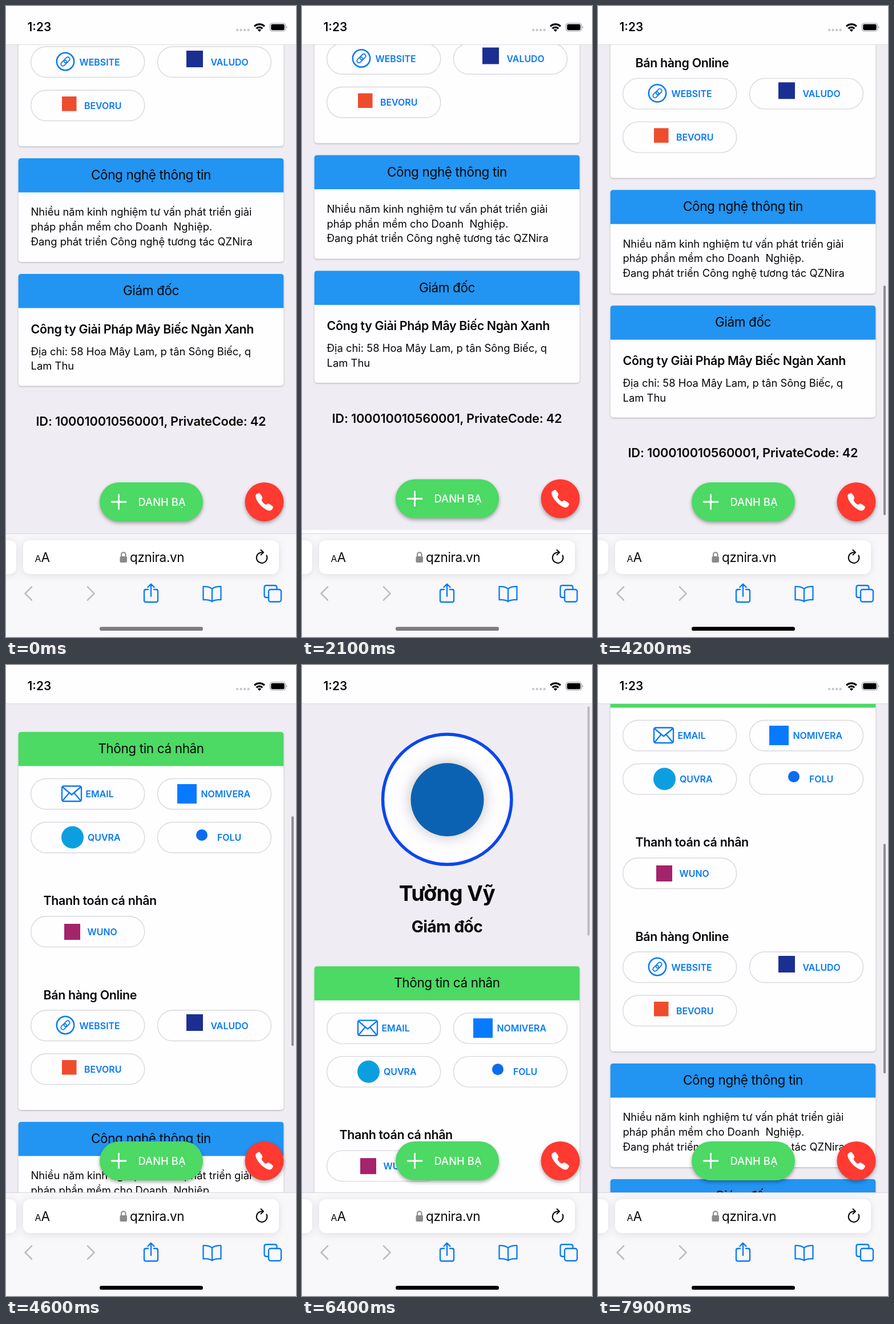
Animation, 508 px wide and 1102 px high, one loop 8 s. Source, as an HTML page:

```html
<!DOCTYPE html>
<html lang="vi">
<head>
<meta charset="utf-8">
<title>Danh thiếp</title>
<style>
  html, body { margin: 0; width: 100%; height: 100%; overflow: hidden; background: #fefdff; }
  svg { display: block; width: 508px; height: 1102px; }
  text { font-family: Inter, Roboto, sans-serif; fill: #080808; white-space: pre; }
  .mid { text-anchor: middle; }
  .head { font-size: 22.5px; letter-spacing: -.36px; }
  .body { font-size: 18.4px; }
  .bold { font-size: 21.4px; font-weight: 600; letter-spacing: -.33px; }
  .id { font-size: 21.8px; font-weight: 600; letter-spacing: -.2px; }
  .name { font-size: 37.5px; font-weight: 700; letter-spacing: -.75px; }
  .role { font-size: 28.2px; font-weight: 700; letter-spacing: -.56px; }
  .label { font-size: 15.9px; font-weight: 600; fill: #087af2; }
  .fab { font-size: 18.4px; font-weight: 500; fill: #fff; }
  .clock { font-size: 20.8px; font-weight: 600; }
  .card { fill: #fefdff; filter: drop-shadow(0 1px 1.5px rgba(0, 0, 0, .26)); }
  .pill { fill: #fefdff; stroke: #d9d9de; stroke-width: 1.4; }
  .float { filter: drop-shadow(0 3px 3px rgba(0, 0, 0, .34)); }
  .field { fill: #fff; filter: drop-shadow(0 2px 7px rgba(0, 0, 0, .1)); }
  .line { fill: none; stroke: #087af2; stroke-width: 2.3; stroke-linecap: round; stroke-linejoin: round; }
  .mute { stroke: #bdbdc2; stroke-width: 2.5; }
</style>
</head>
<body>
<svg viewBox="0 0 508 1102">
  <defs>
    <clipPath id="view"><rect y="68" width="508" height="853"/></clipPath>
  </defs>
  <rect width="508" height="1102" fill="#fefdff"/>

  <g clip-path="url(#view)">
    <g id="page" clip-path="url(#view)">
      <rect y="68" width="508" height="853" fill="#efedf3"/>
      <g id="content"></g>
      <g class="float">
        <rect x="164" y="832" width="181" height="68" rx="34" fill="#4cd964"/>
        <circle cx="452.5" cy="866" r="34" fill="#ff3a30"/>
      </g>
      <path d="M197.500 853.500v25M185 866h25" stroke="#fff" stroke-width="2.8" stroke-linecap="round"/>
      <text class="fab" x="231.500" y="872.600">DANH BẠ</text>
      <path transform="translate(434.800 848.200) scale(.0692)" fill="#fff" d="M391 480c-60 0-165-70-226-133C100 280 20 165 37 91c9-22 30-38 68-55 20-9 32 2 43 14 18 18 43 58 52 77 14 29 12 38-3 62-14 17-13 20-12 23 8 28 30 52 46 69 27 27 57 43 68 45 8 2 12-3 23-12 24-17 36-17 62-2 18 9 59 34 77 52 16 16 22 26 14 43-17 40-33 56-54 65q-15 8-30 8z"/>
    </g>
    <rect id="bar" x="500" width="4" rx="2" fill="#8e8d92"/>
  </g>

  <!-- status bar -->
  <path d="M0 67.500h508" stroke="#dcdbe0"/>
  <text class="clock" x="37.500" y="44.300">1:23</text>
  <path d="M405.200 42h24" stroke="#c9c8cd" stroke-width="4.400" stroke-linecap="round" stroke-dasharray="0 6.500"/>
  <g fill="none" stroke="#000" stroke-width="3.200">
    <path d="M435.200 35.500a12.500 12.500 0 0 1 17.600 0"/>
    <path d="M438.700 39.300a7.600 7.600 0 0 1 10.600 0"/>
  </g>
  <path d="M444 45l-3.200-3.300a4.600 4.600 0 0 1 6.400 0z"/>
  <rect x="462.500" y="30" width="27" height="14" rx="4.300" fill="none" stroke="#9a9a9e" stroke-width="1.200"/>
  <rect x="464.300" y="31.800" width="23.400" height="10.400" rx="2.600"/>
  <path d="M491 34.500a3 3 0 0 1 0 5z" fill="#9a9a9e"/>

  <!-- browser bar -->
  <rect y="921" width="508" height="181" fill="#f8f7fa"/>
  <path d="M0 921.500h508" stroke="#d6d5da"/>
  <rect class="field" x="-60" y="933" width="78" height="59" rx="12"/>
  <rect class="field" x="30" y="933" width="448" height="59" rx="12"/>
  <text x="50.500" y="971" font-size="16">A</text>
  <text x="61.500" y="971" font-size="22.500">A</text>
  <rect x="199.500" y="961" width="12.500" height="11" rx="2" fill="#8a8a8e"/>
  <path d="M202 962v-4a3.800 3.800 0 0 1 7.600 0v4" fill="none" stroke="#8a8a8e" stroke-width="2"/>
  <text class="head" x="217" y="971">qznira.vn</text>
  <g fill="none" stroke="#111" stroke-width="2.100" stroke-linecap="round" stroke-linejoin="round">
    <path d="M456.500 959.500a9.300 9.300 0 1 1-8-5.300h2"/>
    <path d="M446.500 950l4.500 4.200-4.500 4.300"/>
  </g>
  <g class="line">
    <path class="mute" d="M45 1014.500l-11.500 11.500 11.500 11.500M143 1014.500l11.500 11.500-11.500 11.500"/>
    <path d="M249 1019h-4q-3 0-3 3v16q0 3 3 3h18q3 0 3-3v-16q0-3-3-3h-4M254 1031v-21M248.500 1015l5.500-5.500 5.500 5.500"/>
    <path d="M361 1018q-5-4.500-15.500-4v23q10-.5 15.500 3 5.500-3.500 15.500-3v-23q-10.500-.5-15.500 4v22"/>
    <path d="M460 1033h-4q-3.500 0-3.500-3.500v-14q0-3.500 3.500-3.500h15q3.500 0 3.500 3.500v3.500"/>
    <rect x="460" y="1019" width="22" height="21.500" rx="3.500"/>
  </g>
  <rect id="home" x="164" y="1084.300" width="181" height="6.700" rx="3.350"/>
</svg>

<script>
const $ = id => document.getElementById(id);

const text = (cls, x, y, s) => `<text class="${cls}" x="${x}" y="${y}">${s}</text>`;
const mid = (cls, y, s) => text(cls + ' mid', 254, y, s);
const square = (x, y, size, color) =>
  `<rect x="${x}" y="${y}" width="${size}" height="${size}" fill="${color}"/>`;
const disc = (x, y, r, color) => `<circle cx="${x}" cy="${y}" r="${r}" fill="${color}"/>`;

const card = (y, height, color, title) => `
  <rect class="card" x="21.700" y="${y}" width="464.600" height="${height}" rx="5"/>
  <path d="M21.700 ${y + 59.5}v-54.500q0-5 5-5h454.600q5 0 5 5v54.500z" fill="${color}"/>
  ${mid('head', y + 37, title)}`;

const button = (col, y, labelX, label, icon) => `
  <rect class="pill" x="${col ? 265.5 : 43.7}" y="${y}" width="199" height="53.500" rx="26.700"/>
  ${icon}${text('label', labelX, y + 32.7, label)}`;

const envelope = `<g class="line"><rect x="98" y="211.500" width="34" height="26.500" rx="3"/>
  <path d="M99.500 213.500l15.500 13 15.500-13M99.500 236.500l11-13M130.500 236.500l-11-13"/></g>`;
const link = `<g class="line"><circle cx="104" cy="629" r="15.200" stroke-width="2.500"/>
  <g transform="translate(104 629) rotate(-45)" stroke-width="1.800">
  <rect x="-9.500" y="-3.500" width="11.500" height="7" rx="3.500"/>
  <rect x="-2" y="-3.500" width="11.500" height="7" rx="3.500"/></g></g>`;

$('content').innerHTML = `
  <ellipse cx="254.200" cy="-174.500" rx="112.700" ry="113.700" fill="#fefdff" stroke="#0b47ec" stroke-width="5.500"/>
  <circle cx="254.500" cy="-174" r="64" fill="#0c62b2" style="filter:drop-shadow(0 0 12px rgba(0,0,0,.25))"/>
  ${mid('name', 2.5, 'Tường Vỹ')}
  ${mid('role', 58, 'Giám đốc')}

  ${card(117, 660, '#4cd964', 'Thông tin cá nhân')}
  ${button(0, 198.5, 139.5, 'EMAIL', envelope)}
  ${button(1, 198.5, 341.5, 'NOMIVERA', square(300, 208, 34, '#087aff'))}
  ${button(0, 274.5, 143, 'QUVRA', disc(116.5, 301, 19.5, '#0c9fe0'))}
  ${button(1, 274.5, 370, 'FOLU', disc(343, 297, 10, '#0b6cf0'))}
  ${text('bold', 65.5, 419, 'Thanh toán cá nhân')}
  ${button(0, 439, 142.5, 'WUNO', square(102, 452, 28, '#a3246b'))}
  ${text('bold', 65.5, 583.5, 'Bán hàng Online')}
  ${button(0, 603, 128.5, 'WEBSITE', link)}
  ${button(1, 603, 358.5, 'VALUDO', square(316, 610, 29, '#1b2f93'))}
  ${button(0, 679, 137, 'BEVORU', square(98, 690, 25.5, '#ee4d2d'))}

  ${card(798, 181, '#2294f2', 'Công nghệ thông tin')}
  ${text('body', 43.5, 898.3, 'Nhiều năm kinh nghiệm tư vấn phát triển giải')}
  ${text('body', 43.5, 924, 'pháp phần mềm cho Doanh\u00a0 Nghiệp.')}
  ${text('body', 43.5, 949.8, 'Đang phát triển Công nghệ tương tác QZNira')}

  ${card(1000, 195.5, '#2294f2', 'Giám đốc')}
  ${text('bold', 43.5, 1103.5, 'Công ty Giải Pháp Mây Biếc Ngàn Xanh')}
  ${text('body', 43.5, 1141.5, 'Địa chỉ: 58 Hoa Mây Lam, p tân Sông Biếc, q')}
  ${text('body', 43.5, 1167.2, 'Lam Thu')}
  ${mid('id', 1265, 'ID: 100010010560001, PrivateCode: 42')}`;

const LOOP = 8000, STEP = 100, ORIGIN = 409;
const smooth = p => p * p * (3 - 2 * p);
const out = p => 1 - (1 - p) ** 3;
const linear = p => p;

// Each row: time, value, easing used to arrive there.
const scrollKeys = [
  [0, 941], [4100, 941], [4600, 409, smooth], [5500, 409], [5900, -35.5, smooth],
  [6500, 0, out], [7300, 0], [7400, 43], [7900, 511], [8000, 511]
];
// The whole page gives way a little when dragged past its end.
const bounceKeys = [
  [0, 0], [1400, 0], [2000, -5.5, smooth], [2100, -5.5], [2800, 3.7, smooth],
  [3000, .6, smooth], [3400, .6], [3500, 0], [8000, 0]
];
const barKeys = [
  [0, 0], [4100, 0], [4200, 1], [6300, 1], [6500, 0], [7300, 0], [7400, 1], [8000, 1]
];

function sample(keys, t) {
  const i = keys.findIndex(k => k[0] > t);
  const [t0, v0] = keys[i - 1], [t1, v1, ease = linear] = keys[i];
  return v0 + (v1 - v0) * ease((t - t0) / (t1 - t0));
}

function draw(now) {
  const t = Math.floor((now % LOOP) / STEP) * STEP;
  const scroll = sample(scrollKeys, t);
  $('content').setAttribute('transform', `translate(0 ${ORIGIN - scroll})`);
  $('page').setAttribute('transform', `translate(0 ${sample(bounceKeys, t)})`);
  $('bar').setAttribute('y', 72 + .47 * Math.max(0, scroll));
  $('bar').setAttribute('height', 401 + Math.min(0, scroll));
  $('bar').setAttribute('opacity', sample(barKeys, t));
  $('home').setAttribute('fill', t < 2900 ? '#7d7c80' : '#000');
}

const start = performance.now();
function tick() {
  draw(performance.now() - start);
  requestAnimationFrame(tick);
}
tick();
</script>
</body>
</html>
```
